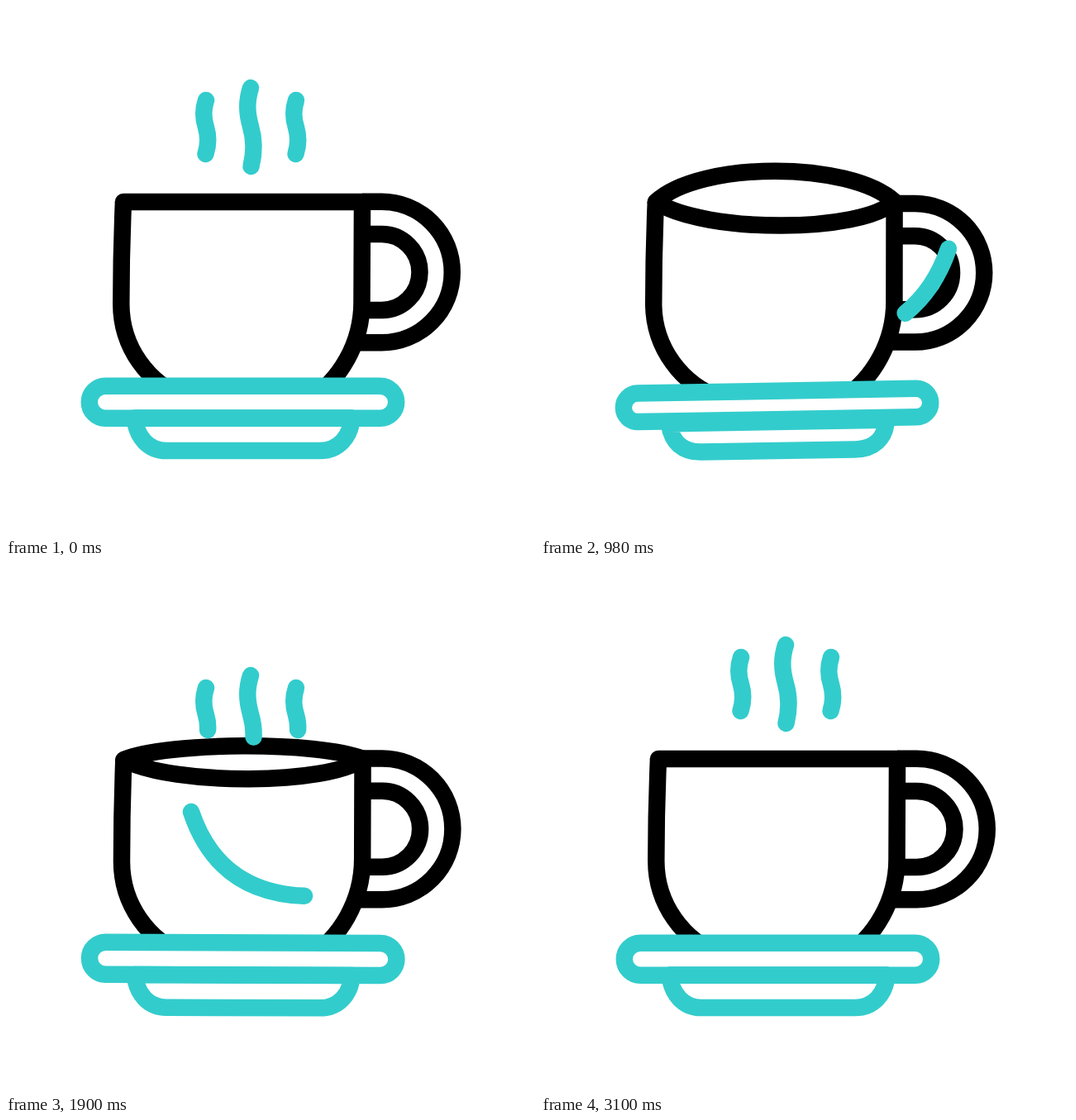
An HTML page for the animation above (3.2 s loop, 640 by 640 pixels).

```html
<!DOCTYPE html>
<html lang="en">
<head>
<meta charset="utf-8">
<title>Coffee cup</title>
<style>
  html, body { margin: 0; width: 100%; height: 100%; overflow: hidden; background: #fff; }
  svg { display: block; width: 100%; height: 100%; }
  path, rect { fill: none; stroke: #33cccc; stroke-width: 20.5; stroke-linecap: round; stroke-linejoin: round; }
  #cup path { stroke: #000; stroke-linecap: butt; }
  #plate { fill: #fff; }
</style>
</head>
<body>
<svg viewBox="0 0 640 640">
  <g id="cup">
    <path id="outer"/><path id="inner"/><path id="body"/><path id="rim"/>
  </g>
  <g id="saucer"><rect id="plate"/><path id="bowl"/></g>
  <g id="steam">
    <path pathLength="1" d="M242 114C238 126 239 138 242 147C245 157 245 168 241.5 179"/>
    <path pathLength="1" d="M296 99C291 115 291 128 296 146C301 163 300.5 178 296.5 194"/>
    <path pathLength="1" d="M351 114C347 126 348 138 351 147C354 157 354 168 350.5 179"/>
  </g>
  <path id="swoosh" pathLength="1" d="M-146 -102C-122 -30 -70 0 0 0C72 0 128 -38 153 -111"/>
</svg>
<script>
const LOOP = 3200, STEP = 20, REST = 3100;
const $ = id => document.getElementById(id);
const set = (el, attrs) => { for (const k in attrs) el.setAttribute(k, attrs[k]); };
const wisps = [...$('steam').children];

// Smooth curve through [time, value] points that never overshoots them.
function curve(points) {
  const n = points.length - 1;
  const slope = i => (points[i + 1][1] - points[i][1]) / (points[i + 1][0] - points[i][0]);
  const tangent = i => {
    if (i === 0 || i === n) return 0;
    const a = slope(i - 1), b = slope(i);
    return a * b <= 0 ? 0 : 2 * a * b / (a + b);
  };
  return t => {
    if (t <= points[0][0]) return points[0][1];
    if (t >= points[n][0]) return points[n][1];
    const i = points.findIndex(p => p[0] > t) - 1;
    const [t0, a] = points[i], [t1, b] = points[i + 1];
    const d = t1 - t0, u = (t - t0) / d, s = u * u * (3 - 2 * u);
    return a + (b - a) * s
      + d * u * (1 - u) * ((1 - u) * tangent(i) - u * tangent(i + 1));
  };
}

const tilt = curve([[200, 0], [660, -1.65], [780, -1.9], [1260, 1.15], [1480, 1.97], [1580, 1.87],
  [2220, -1.65], [2340, -1.9], [2620, -1.07], [2920, -0.1], [REST, 0]]);
const rimUp = curve([[200, 0], [660, 43], [780, 46], [1260, 17.5], [1580, 8.5],
  [2220, 26], [2320, 27], [2620, 14], [2980, 1], [REST, 0]]);
const rimDown = curve([[200, 0], [660, 30.5], [780, 33], [1260, 19.5], [1560, 15.5],
  [2220, 34.5], [2320, 36], [2620, 22], [2980, 1.5], [REST, 0]]);

const phase = (t, from, to) => Math.min(1, Math.max(0, (t - from) / (to - from)));
const ease = (t, from, to) => { const u = phase(t, from, to); return u * u * (3 - 2 * u); };
const easeIn = (t, from, to) => phase(t, from, to) ** 2;

function trim(el, from, to) {
  const len = to - from;
  el.style.display = len > 0.003 ? '' : 'none';
  set(el, len > 0.997
    ? { 'stroke-dasharray': 'none', 'stroke-dashoffset': 0 }
    : { 'stroke-dasharray': `${len} 3`, 'stroke-dashoffset': -from });
}

function drawCup(t, rot) {
  const neg = Math.min(rot, 0), pos = Math.max(rot, 0);
  const rad = rot * Math.PI / 180, cos = Math.cos(rad), sin = Math.sin(rad);

  // rim corners
  const lx = 142 + 3.2 * neg + 1.8 * pos, ly = 237 + 4.4 * pos;
  const rx = 431 + 3.5 * neg + 2.6 * pos, ry = 237 - 0.4 * Math.abs(rot);
  const up = rimUp(t) * 4 / 3, down = rimDown(t) * 4 / 3;
  set($('rim'), { d: `M${lx} ${ly}C${lx + 53} ${ly - up} ${rx - 55} ${ry - up} ${rx} ${ry}`
    + `C${rx - 40} ${ry + down} ${lx + 60} ${ly + down} ${lx} ${ly}Z` });

  // walls, each running into an arc that ends behind the saucer
  const wall = (x, y, topX, topY, r, degrees, side) => {
    const a = degrees * Math.PI / 180;
    const dx = side * r * (1 - Math.cos(a)), dy = r * Math.sin(a);
    const ex = x + dx * cos - dy * sin, ey = y + dx * sin + dy * cos;
    return `M${topX} ${topY}Q${x} ${(topY + y) / 2} ${x} ${y}`
      + `A${r} ${r} 0 0 ${side > 0 ? 0 : 1} ${ex} ${ey}`;
  };
  const lean = 181 * sin;
  set($('body'), { d: wall(139.3 + lean, 360.5 + 1.5 * Math.abs(rot), lx, ly, 122, 70, 1)
    + wall(430.5 + lean, 358 + 3 * rot, rx, ry, 143, 58, -1) });

  // handle
  const cx = 454.5 + 2 * neg + 2.9 * pos, cy = 322 - 0.8 * rot;
  const loop = (r, back) => `M${rx} ${cy - r}H${cx}A${r} ${r} 0 0 1 ${cx} ${cy + r}H${rx - back}`;
  set($('outer'), { d: loop(85.3 + 1.6 * neg, 6) });
  set($('inner'), { d: loop(46 + 1.5 * neg, 0) });

  // saucer
  const h = 39 + 4.5 * neg + 0.7 * pos, mid = 479.2 - 3.8 * neg - 1.6 * pos;
  const top = 498.5 - 4.6 * neg;
  set($('plate'), { x: 100.8, y: mid - h / 2, width: 371.4, height: h, rx: h / 2 });
  set($('bowl'), { d: `M155.5 ${top}C158 ${top + 23} 172 538 194 538`
    + `H380C402 538 417 ${top + 23} 418.5 ${top}Z` });
  set($('saucer'), { transform: `rotate(${rot} 286.5 538)` });
}

function drawSteam(t) {
  let from = 0, to = 1, drop = 0;
  if (t < 980) to = 1 - easeIn(t, 200, 900);
  else if (t < 2310) {
    drop = 37;
    from = 1 - ease(t, 1050, 1820);
    to = 1 - easeIn(t, 1560, 2293);
  } else {
    drop = 37 * (1 - ease(t, 2440, REST));
    from = 1 - ease(t, 2320, 3010);
  }
  wisps.forEach(w => trim(w, from, to));
  set($('steam'), { transform: `translate(0 ${drop})` });
}

function drawSwoosh(t) {
  let from, to, x, y;
  if (t < 1140) {
    const go = ease(t, 600, 1130);
    from = ease(t, 660, 1130);
    to = ease(t, 200, 937);
    x = 216 + 154 * go;
    y = 412 - 9 * go;
  } else if (t < 2400) {
    from = 1 - ease(t, 1140, 1860);
    to = 1 - ease(t, 1570, 2200);
    x = 370;
    y = 403;
  } else {
    from = ease(t, 2860, 3090);
    to = ease(t, 2640, 2980);
    x = 189;
    y = 412;
  }
  trim($('swoosh'), from, to);
  set($('swoosh'), { transform: `translate(${x} ${y})` });
}

const start = performance.now();
function frame() {
  const now = Math.max(0, performance.now() - start) % LOOP;
  const t = Math.min(REST, Math.floor(now / STEP) * STEP);
  drawCup(t, tilt(t));
  drawSteam(t);
  drawSwoosh(t);
  requestAnimationFrame(frame);
}
frame();
</script>
</body>
</html>
```
